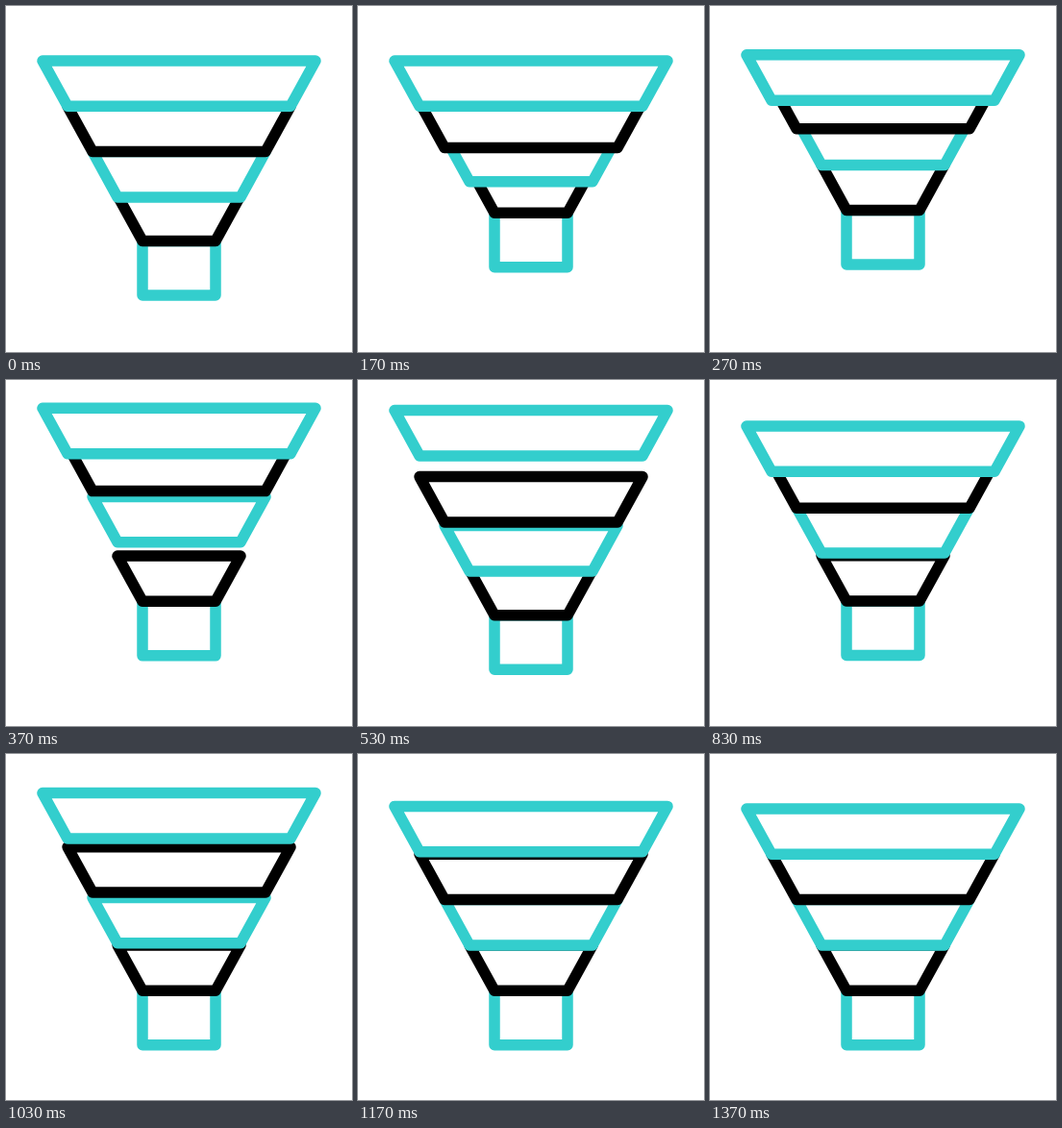
Recreate the animation shown at these times as an HTML page. Size 360 by 360 pixels, loop 1.67 s.

```html
<!DOCTYPE html>
<html lang="en">
<head>
<meta charset="utf-8">
<title>Bouncing funnel</title>
<style>
  html, body { margin: 0; height: 100%; overflow: hidden; background: #fff; }
  svg { display: block; width: 100vw; height: 100vh; }
  path { fill: #fff; stroke-width: 11.5; stroke-linejoin: round; }
</style>
</head>
<body>
<svg viewBox="0 0 360 360"></svg>
<script>
const LOOP = 1670, FPS = 30;
const TOP = 57, LEFT = 38, INSET = 26, HEIGHT = 47.3;
const CYAN = '#33cecd', BLACK = '#000';
const HEIGHTS = [0, -36, 0, -19, 0];

// Per tier: start, first peak, landing, second peak, rest (ms)
const BOUNCES = [
  [205, 440, 700, 975, 1225],
  [114, 365, 575, 865, 1160],
  [42, 310, 533, 820, 1090],
  [-35, 228, 485, 775, 1015]
];

const svg = document.querySelector('svg');

function addPart(color, y, h, x0, x1) {
  const path = document.createElementNS(svg.namespaceURI, 'path');
  path.setAttribute('d', `M${x0} ${y}H${360 - x0}L${360 - x1} ${y + h}H${x1}Z`);
  path.setAttribute('stroke', color);
  svg.prepend(path); // upper tiers cover lower ones
  return path;
}

const tiers = BOUNCES.map((times, i) => {
  const x = LEFT + i * INSET;
  return [addPart(i % 2 ? BLACK : CYAN, TOP + i * HEIGHT, HEIGHT, x, x + INSET)];
});
const spoutX = LEFT + 4 * INSET;
tiers[3].push(addPart(CYAN, TOP + 4 * HEIGHT, 56.5, spoutX, spoutX));

function offset(times, t) {
  const i = times.findIndex(time => t < time);
  if (i < 1) return 0;
  const s = (t - times[i - 1]) / (times[i] - times[i - 1]);
  return HEIGHTS[i - 1] + (HEIGHTS[i] - HEIGHTS[i - 1]) * s * s * (3 - 2 * s);
}

function draw() {
  const ms = performance.now() % LOOP;
  const t = Math.floor((ms + 4) * FPS / 1000) * 1000 / FPS;
  tiers.forEach((parts, i) => {
    const y = offset(BOUNCES[i], t);
    parts.forEach(part => part.setAttribute('transform', `translate(0 ${y})`));
  });
  requestAnimationFrame(draw);
}
draw();
</script>
</body>
</html>
```
